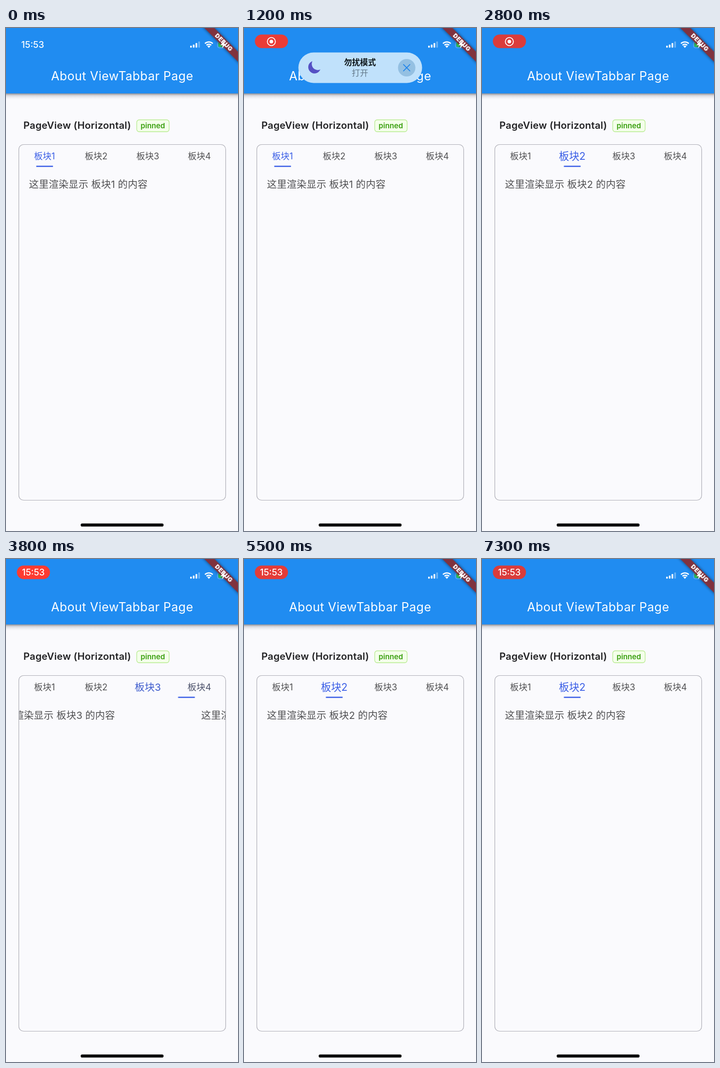
Write an HTML page that moves like this. It is 480x1038 px and loops after 7400 ms.

```html
<!DOCTYPE html>
<html lang="zh">
<head>
<meta charset="utf-8">
<title>ViewTabbar</title>
<style>
html, body { margin: 0; width: 100%; height: 100%; overflow: hidden; background: #fafafd; }
svg { display: block; width: 100%; height: 100%; }
text { font-family: Inter, "Noto Sans CJK SC", "Noto Sans CJK", sans-serif; }
.mid { text-anchor: middle; }
.clock { font-size: 18.5px; font-weight: 500; fill: #fff; text-anchor: middle; }
.tab { font-size: 18px; text-anchor: middle; fill: #505052; }
.page { font-size: 20.3px; letter-spacing: .2px; fill: #505052; }

/* One 7.4 s loop drives everything; taps go 1, 2, 4, 2, 1, 2 */
.run { animation: 7.4s linear infinite; }
.pages { animation-name: pages; }
.line { animation-name: line; animation-timing-function: ease; }
.t1 { animation-name: t1; }
.t2 { animation-name: t2; }
.t3 { animation-name: t3; }
.t4 { animation-name: t4; }
.plain { animation-name: plain; }
.pill { animation-name: pill; }
.pulse { animation-name: pulse; animation-timing-function: ease-in-out; }
.rec { animation-name: rec; }
.time { animation-name: time; }
.toast { animation-name: toast; }

@keyframes pages {
  0%, 33.6% { transform: translateX(0); }
  37.65%, 49% { transform: translateX(-428px); }
  53.05%, 64.14% { transform: translateX(-1284px); }
  68.19%, 79.27% { transform: translateX(-428px); }
  83.32%, 94.4% { transform: translateX(0); }
  98.46%, 100% { transform: translateX(-428px); }
}
@keyframes line {
  0%, 33.6% { transform: translateX(0); }
  37.65%, 49% { transform: translateX(106.8px); }
  53.05%, 64.14% { transform: translateX(320.4px); }
  68.19%, 79.27% { transform: translateX(106.8px); }
  83.32%, 94.4% { transform: translateX(0); }
  98.46%, 100% { transform: translateX(106.8px); }
}
@keyframes t1 {
  0%, 33.6% { transform: scale(1); fill: #3a5ee6; }
  37.65%, 79.27% { transform: scale(1); fill: #505052; }
  83.32%, 94.4% { transform: scale(1.18); fill: #3a5ee6; }
  98.46%, 100% { transform: scale(1); fill: #505052; }
}
@keyframes t2 {
  0%, 33.6% { transform: scale(1); fill: #505052; }
  37.65%, 49% { transform: scale(1.18); fill: #3a5ee6; }
  51.03%, 66.17% { transform: scale(1); fill: #505052; }
  68.19%, 79.27% { transform: scale(1.18); fill: #3a5ee6; }
  83.32%, 94.4% { transform: scale(1); fill: #505052; }
  98.46%, 100% { transform: scale(1.18); fill: #3a5ee6; }
}
@keyframes t3 {
  0%, 49%, 53.05%, 64.14%, 68.19%, 100% { transform: scale(1); fill: #505052; }
  51.03%, 66.17% { transform: scale(1.18); fill: #3a5ee6; }
}
@keyframes t4 {
  0%, 51.03% { transform: scale(1); fill: #505052; }
  53.05%, 64.14% { transform: scale(1.18); fill: #3a5ee6; }
  66.17%, 100% { transform: scale(1); fill: #505052; }
}
@keyframes plain { 0%, 3% { opacity: 1; } 5%, 100% { opacity: 0; } }
@keyframes pill { 0%, 3% { opacity: 0; } 6%, 100% { opacity: 1; } }
@keyframes pulse {
  0% { fill: #fa3b31; }
  9.46%, 39.19%, 68.92%, 98.65%, 100% { fill: #da3c3b; }
  24.32%, 54.05%, 83.78% { fill: #ff3b30; }
}
@keyframes rec { 0%, 42% { opacity: 1; } 45%, 100% { opacity: 0; } }
@keyframes time { 0%, 42% { opacity: 0; } 45%, 100% { opacity: 1; } }
@keyframes toast {
  0%, 2.7% { transform: translateY(-125px); animation-timing-function: ease-out; }
  6.8%, 19.6% { transform: translateY(0); animation-timing-function: ease-in; }
  23.6%, 100% { transform: translateY(-125px); }
}
</style>
</head>
<body>
<svg viewBox="0 0 480 1038">
  <defs>
    <linearGradient id="shade" x2="0" y2="1">
      <stop offset="0" stop-color="#505058" stop-opacity=".65"/>
      <stop offset=".35" stop-color="#8c8c96" stop-opacity=".3"/>
      <stop offset="1" stop-color="#d0d0d8" stop-opacity="0"/>
    </linearGradient>
    <clipPath id="card"><rect x="26.5" y="240.5" width="428" height="734" rx="10"/></clipPath>
  </defs>

  <rect width="480" height="1038" fill="#fafafd"/>
  <rect y="135" width="480" height="13" fill="url(#shade)"/>
  <rect width="480" height="135" fill="#208cf1"/>
  <text class="mid" x="240.4" y="108" font-size="25" letter-spacing=".5" fill="#fff">About ViewTabbar Page</text>

  <text x="36" y="208" font-size="20.3" font-weight="600" letter-spacing=".2" fill="#222224">PageView (Horizontal)</text>
  <rect x="270.5" y="189.5" width="67" height="24.5" rx="5" fill="#f4ffea" stroke="#b7eb8f" stroke-width="1.3"/>
  <text class="mid" x="303.8" y="206.5" font-size="15.2" font-weight="600" fill="#389e0d">pinned</text>

  <g clip-path="url(#card)">
    <g class="run pages">
      <text class="page" x="47.5" y="329.5">这里渲染显示 板块1 的内容</text>
      <text class="page" x="475.5" y="329.5">这里渲染显示 板块2 的内容</text>
      <text class="page" x="903.5" y="329.5">这里渲染显示 板块3 的内容</text>
      <text class="page" x="1331.5" y="329.5">这里渲染显示 板块4 的内容</text>
    </g>
  </g>
  <g transform="translate(79.7 264)"><text class="tab run t1" y="6.7">板块1</text></g>
  <g transform="translate(186.6 264)"><text class="tab run t2" y="6.7">板块2</text></g>
  <g transform="translate(293.4 264)"><text class="tab run t3" y="6.7">板块3</text></g>
  <g transform="translate(400 264)"><text class="tab run t4" y="6.7">板块4</text></g>
  <rect class="run line" x="62.6" y="284.2" width="34.6" height="2.5" fill="#3a5ee6"/>
  <rect x="26.5" y="240.5" width="428" height="734" rx="10" fill="none" stroke="#aeaeb6" stroke-width="1.2"/>

  <text class="clock run plain" x="55.2" y="41">15:53</text>
  <g class="run pill">
    <rect class="run pulse" x="22.5" y="13.5" width="68.5" height="28" rx="14"/>
    <g class="run rec">
      <circle cx="56.6" cy="28" r="8.3" fill="none" stroke="#fff" stroke-width="1.8"/>
      <circle cx="56.6" cy="28" r="3.8" fill="#fff"/>
    </g>
    <text class="clock run time" x="56.6" y="34.3">15:53</text>
  </g>

  <g fill="#fff">
    <rect x="381" y="36.5" width="3.4" height="4" rx="1"/>
    <rect x="386.6" y="34.2" width="3.4" height="6.3" rx="1"/>
    <rect x="392.2" y="31" width="3.4" height="9.5" rx="1"/>
    <rect x="397.8" y="27.8" width="3.4" height="12.7" rx="1" opacity=".35"/>
    <path d="M419.7 41l-3.2-3.4a4.6 4.6 0 0 1 6.4 0z"/>
    <path d="M411.6 32.2a11.5 11.5 0 0 1 16.2 0M414.8 35.5a7 7 0 0 1 9.8 0" fill="none" stroke="#fff" stroke-width="2.5"/>
  </g>
  <rect x="437.5" y="28" width="24" height="13" rx="4" fill="none" stroke="#b4d8f4" stroke-opacity=".6"/>
  <rect x="439.3" y="29.8" width="20.4" height="9.4" rx="2.4" fill="#34c759"/>

  <g class="run toast">
    <rect x="112.5" y="50.5" width="256" height="63" rx="31.5" fill="#c0e1fb"/>
    <path d="M141.5 68.5A13 13 0 1 0 158 85.5A12.5 12.5 0 0 1 141.5 68.5Z" fill="#5550c4"/>
    <text class="mid" x="240" y="77" font-size="16.5" font-weight="600" fill="#10181c">勿扰模式</text>
    <text class="mid" x="240" y="99" font-size="17" fill="#64798a">打开</text>
    <circle cx="336.6" cy="82" r="18" fill="#94c0e2"/>
    <path d="M330 75.4l13.2 13.2m0-13.2L330 88.6" stroke="#1f84ea" stroke-width="1.8" stroke-linecap="round"/>
  </g>

  <g transform="translate(480 0) rotate(45)">
    <rect x="-60" y="34.5" width="120" height="14.7" fill="#80323e" style="filter:drop-shadow(0 0 3px rgba(0,0,0,.55))"/>
    <text class="mid" x=".4" y="46.3" font-size="12.4" font-weight="900" letter-spacing=".6" fill="#fff">DEBUG</text>
  </g>
  <path d="M452 26.5l-8.5 9h5.2l-2 6.5 8.6-9h-5.2z" fill="#fff"/>

  <rect x="154.5" y="1022.6" width="171.5" height="6.2" rx="3.1" fill="#000"/>
</svg>
</body>
</html>
```
